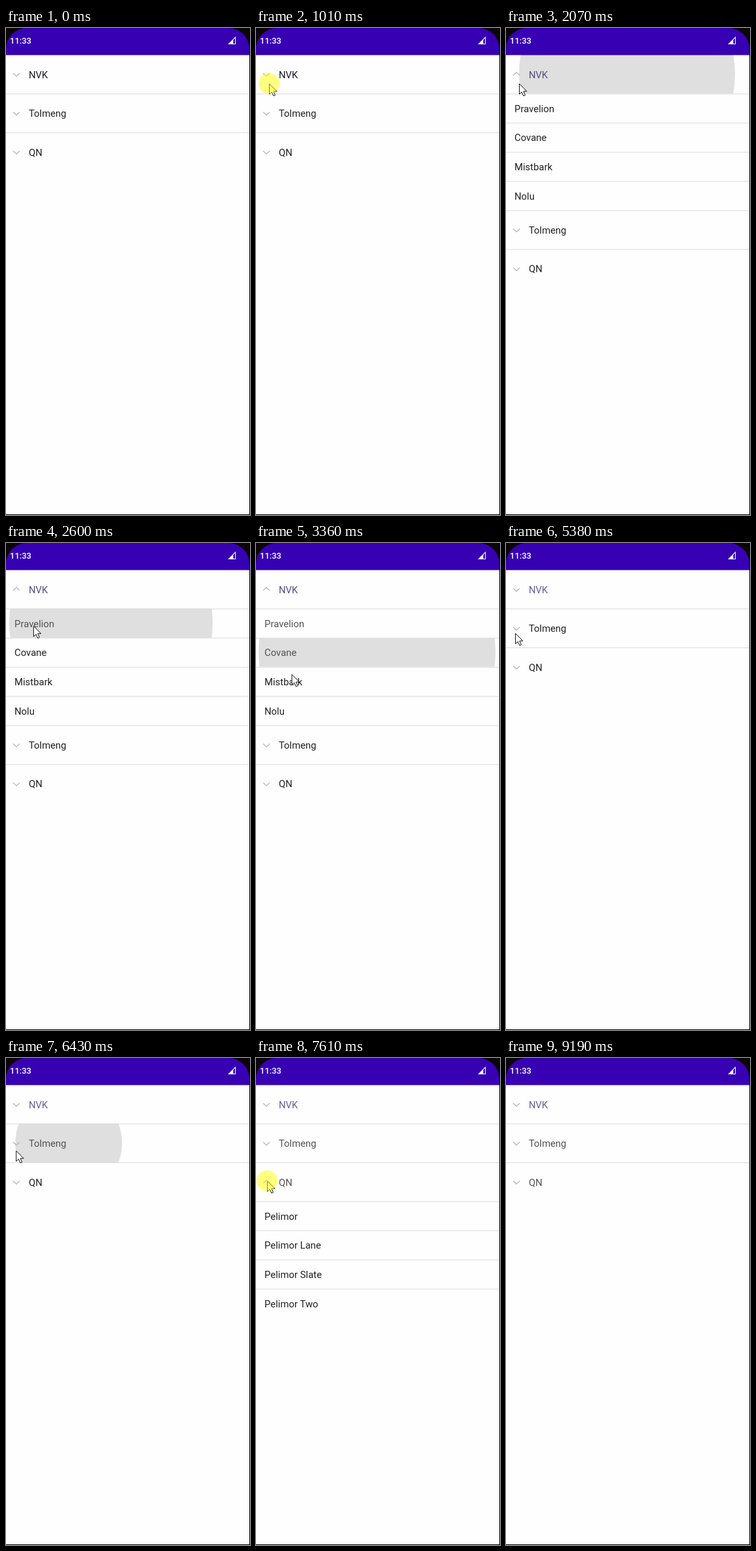
Animation of 375x746 px, one loop 9.63 s. Source, as an HTML page:

```html
<!DOCTYPE html>
<html lang="en">
<head>
<meta charset="utf-8">
<title>Expandable list</title>
<style>
  html, body { margin: 0; width: 100%; height: 100%; overflow: hidden; background: #000; }
  #stage { display: block; width: 375px; height: 746px; }
  text { font: 14.9px Roboto, sans-serif; }
  .clock { font-size: 13px; font-weight: 500; fill: #fff; }
  .divider { fill: #dedede; }
  .ripple { fill: #dfdfdf; }
  .chevron { fill: none; stroke: #b9b9b9; stroke-width: 1.4; }
</style>
</head>
<body>
<svg id="stage" viewBox="0 0 375 746">
  <rect width="375" height="746" fill="#0b0508"/>
  <rect y="41" width="374" height="704" fill="#fefefe"/>
  <path d="M374.5 0V745.5H0" fill="none" stroke="#000"/>
  <g id="list"></g>
  <path d="M0 41.4V32A32 32 0 0 1 32 0H342A32 32 0 0 1 374 32V41.4Z" fill="#3700b3"/>
  <text class="clock" x="6" y="24">11:33</text>
  <path d="M341 25L353 13V25Z" fill="#fff"/>
  <path d="M349.3 18.3L352 15.6V24H349.3Z" fill="#3700b3"/>
  <path id="cursor" d="M.5 .5V16.5L4.2 13L6.9 19L9.5 17.9L6.9 12H12Z" fill="#fff" stroke="#111"/>
  <circle id="press" r="15.8" fill="#ff0" fill-opacity=".5"/>
</svg>
<script>
const LOOP = 9630, LIST_TOP = 40.9;
const PRESS = 120, GROW = 120, HOLD = 100, FADE = 200, REST = 100;

// Row geometry and the reach of a touch ripple
const GROUP = { height: 59.5, x: 34.9, baseline: 35.7, reach: 166 };
const CHILD = { height: 44.7, x: 13, baseline: 28.2, reach: 182 };

const menu = {
  NVK: ['Pravelion', 'Covane', 'Mistbark', 'Nolu'],
  Tolmeng: ['Quarrel P', 'Quarrel Note', 'Quarrel Tab'],
  QN: ['Pelimor', 'Pelimor Lane', 'Pelimor Slate', 'Pelimor Two']
};

// The pointer rests at each tap and glides between them
const taps = [
  { at: 1010, on: 'NVK', x: 20, y: 85, leave: 2070, hold: 830 },
  { at: 2380, on: 'Pravelion', x: 40, y: 120 },
  { at: 3060, on: 'Covane', x: 52, y: 163 },
  { at: 3700, on: 'Nolu', x: 58, y: 250, leave: 4060 },
  { at: 4590, on: 'NVK', x: 18, y: 72, leave: 5050 },
  { at: 5470, on: 'Tolmeng', x: 14, y: 138 },
  { at: 6260, on: 'Tolmeng', x: 15, y: 137 },
  { at: 6830, on: 'QN', x: 17, y: 187 },
  { at: 7600, on: 'QN', x: 17, y: 188, leave: 7880 }
];
const stops = [{ at: 200, x: 132, y: 746 }, ...taps, { at: 8580, x: 126, y: -24 }];

const $ = id => document.getElementById(id);
const lerp = (a, b, p) => a + (b - a) * p;
const clamp = v => Math.min(1, Math.max(0, v));
const ease = p => p * p * (3 - 2 * p);
const show = (el, on) => el.setAttribute('display', on ? 'inline' : 'none');

function add(parent, tag, attrs, text) {
  const el = document.createElementNS('http://www.w3.org/2000/svg', tag);
  for (const key in attrs) el.setAttribute(key, attrs[key]);
  if (text) el.textContent = text;
  return parent.appendChild(el);
}

function makeRow(name, kind, saturation = 0) {
  const { height, x, baseline } = kind;
  const el = add($('list'), 'g', {});
  const clip = add(el, 'svg', { width: 374, height });
  const ripple = add(clip, 'circle', { class: 'ripple', cy: height / 2 });
  const divider = add(el, 'rect', { class: 'divider', width: 374, height: 1.1 });
  const label = add(el, 'text', { x, y: baseline }, name);
  return { ...kind, el, ripple, divider, label, saturation, taps: taps.filter(tap => tap.on === name) };
}

const groups = Object.entries(menu).map(([name, children], i) => {
  const group = makeRow(name, GROUP, i ? 0 : 24);
  group.chevron = add(group.el, 'path', { class: 'chevron' });
  group.children = children.map(child => makeRow(child, CHILD));
  return group;
});

function drawRipple({ ripple, reach }, tap, t) {
  const age = tap ? t - tap.at - PRESS : Infinity;
  const grow = clamp(age / GROW);
  const fade = clamp((age - GROW - (tap?.hold ?? HOLD)) / FADE);
  show(ripple, fade < 1);
  ripple.setAttribute('cx', lerp(30, 186, grow));
  ripple.setAttribute('r', lerp(20, reach, grow) + 40 * fade);
  ripple.setAttribute('opacity', 1 - fade);
}

function drawRow(row, y, t) {
  const done = row.taps.filter(tap => t >= tap.at + PRESS);
  row.el.setAttribute('transform', `translate(0 ${y})`);
  show(row.divider, y > LIST_TOP);
  drawRipple(row, done.at(-1), t);
  // Labels stay paler once they have been tapped
  const light = done.length ? 32 + row.saturation * done.length / 3 : 13;
  row.label.style.fill = `hsl(252 ${row.saturation}% ${light}%)`;
  return done.length;
}

function drawList(t) {
  let y = LIST_TOP;
  for (const group of groups) {
    const open = drawRow(group, y, t) % 2 === 1;
    group.chevron.setAttribute('d', open ? 'M11 31.9L16 27L21 31.9' : 'M11 28.4L16 33.2L21 28.4');
    y += group.height;
    for (const child of group.children) {
      show(child.el, open);
      if (!open) continue;
      drawRow(child, y, t);
      y += child.height;
    }
  }
}

function drawPointer(t) {
  const next = stops.findIndex(stop => stop.at - REST > t);
  const visible = next > 0;
  show($('cursor'), visible);
  show($('press'), visible && taps.some(({ at }) => t >= at && t < at + PRESS));
  if (!visible) return;
  const from = stops[next - 1], to = stops[next];
  const leave = from.leave ?? from.at + REST;
  const p = ease(clamp((t - leave) / (to.at - REST - leave)));
  const place = `translate(${lerp(from.x, to.x, p)} ${lerp(from.y, to.y, p)})`;
  for (const id of ['cursor', 'press']) $(id).setAttribute('transform', place);
}

const began = performance.now();
function frame() {
  const t = (performance.now() - began) % LOOP;
  drawList(t);
  drawPointer(t);
  requestAnimationFrame(frame);
}
frame();
</script>
</body>
</html>
```
